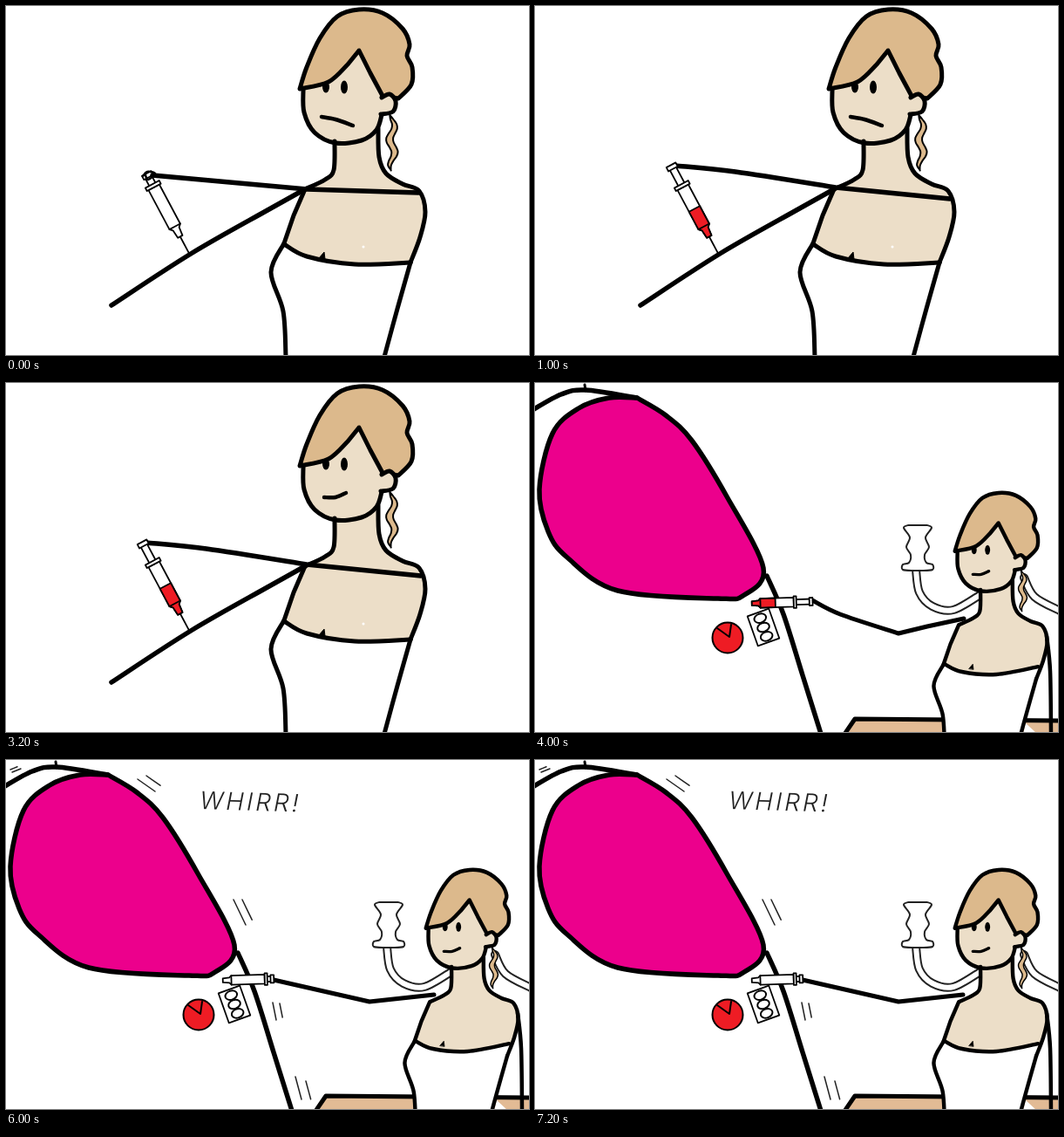
Recreate the animation shown at these times as an HTML page with a canvas. Size 600x400 px, loop 8000 ms.

```html
<!DOCTYPE html>
<html lang="en">
<head>
<meta charset="utf-8">
<style>
  html, body { margin: 0; width: 100%; height: 100%; overflow: hidden; background: #fff; }
  canvas { display: block; }
</style>
</head>
<body>
<canvas id="stage" width="600" height="400"></canvas>
<script>
const ctx = document.getElementById('stage').getContext('2d');
const SKIN = '#ecdec8', HAIR = '#dcb98c', RED = '#ee1c24', PINK = '#ec008c', WOOD = '#e2bb95';
const INK = '#000', PENCIL = '#222', PAPER = '#fff';
const LOOP = 8000;

// Smooth curve through "x,y x,y ..."; "|" makes a corner between two curves.
function trace(points) {
  ctx.beginPath();
  points.split('|').forEach((part, i) => {
    const p = part.trim().split(/\s+/).map(s => s.split(',').map(Number));
    ctx[i ? 'lineTo' : 'moveTo'](...p[0]);
    for (let k = 0; k < p.length - 1; k++) {
      const a = p[k - 1] || p[k], b = p[k], c = p[k + 1], d = p[k + 2] || c;
      ctx.bezierCurveTo(b[0] + (c[0] - a[0]) / 6, b[1] + (c[1] - a[1]) / 6,
                        c[0] - (d[0] - b[0]) / 6, c[1] - (d[1] - b[1]) / 6, ...c);
    }
  });
}

function stroke(width, color = INK) {
  ctx.lineWidth = width;
  ctx.strokeStyle = color;
  ctx.stroke();
}

function ink(points, width, color) {
  trace(points);
  stroke(width, color);
}

function fill(points, color) {
  trace(points);
  ctx.fillStyle = color;
  ctx.fill();
}

function shape(points, color, width, line) {
  fill(points, color);
  ctx.closePath();
  stroke(width, line);
}

function oval(x, y, rx, ry, color) {
  ctx.beginPath();
  ctx.ellipse(x, y, rx, ry, 0, 0, 7);
  ctx.fillStyle = color;
  ctx.fill();
}

function placed(x, y, angle, scale, draw) {
  ctx.save();
  ctx.translate(x, y);
  ctx.rotate(angle);
  ctx.scale(scale, scale);
  draw();
  ctx.restore();
}

// Completes the right half of an outline by reflecting it in x = 0.
function mirror(half) {
  const left = half.split(/\s+/).reverse().map(s => s === '|' ? s : '-' + s);
  return `${half} | ${left.join(' ')}`;
}

// Points down from the thumb rest; push is how far the plunger has moved.
function syringe(x, y, angle, scale, { push = 0, full = false, needle = false }) {
  placed(x, y, angle, scale, () => {
    const part = (half, color = PAPER) => shape(mirror(half), color, 1.8 / scale);
    const nozzle = '7,78 | 4,81 | 3,91';
    if (needle) ink('0,88 0,112', 1.8);
    part(`4,${push} | 4,24`);
    part(`6,${push - 2} | 6,${push + 3}`);
    part('7,27 | ' + nozzle);
    if (full) part('7,55 | ' + nozzle, RED);
    ink('-7,78 7,78', 1.8 / scale);
    part('9,23 | 9,27');
  });
}

// A lock of hair that sways around x and tapers at both ends.
function lock(x, top, bottom) {
  const edge = side => Array.from({ length: 13 }, (_, i) => {
    const u = i / 12, y = top + u * (bottom - top);
    const sway = 3 * Math.cos((y - top - 13) / 30 * 2 * Math.PI);
    return `${x + sway + side * 4 * Math.sin(Math.PI * u) ** .6},${y}`;
  });
  shape([...edge(-1), ...edge(1).reverse()].join(' '), HAIR, 2);
}

function woman({ pen, neckline, cleavage, smiling }) {
  const left = '377,155 376,188 366,199 343,210 | 330,240 319,272';
  const waist = '319,272 304,305 318,350 321,402';
  const right = '427,140 428,173 436,192 455,204 474,212 481,236 475,265 464,294';
  const side = '464,294 449,347 434,402';
  const jaw = '341,96 342,122 354,145 378,157 408,154 425,142 431,125';
  const ear = '431,105 440,101 447,109 444,121 430,124';
  const backwards = right.split(' ').reverse().join(' ');

  lock(443, 125, 188);
  fill(`${waist} | ${side.split(' ').reverse().join(' ')}`, PAPER);
  fill(`${left} | ${neckline} | ${backwards}`, SKIN);
  fill(`${jaw} | 432,103 | 405,51`, SKIN);
  ink(jaw, pen);
  shape('337,95 345,70 360,37 380,12 405,4 432,8 455,26 463,44 460,57 466,70 465,90 450,106 | ' +
        '432,103 | 418,77 405,51 | 392,67 370,87 337,95', HAIR, pen);
  fill(ear, SKIN);
  ink(ear, pen);

  oval(367, 93, 4, 6.5, INK);
  oval(388, 93, 4, 7.5, INK);
  ink(smiling ? '365,131 378,131 390,126' : '362,127 378,130 398,137', 4.5);

  for (const line of [left, waist, right, side, neckline]) ink(line, pen);
  placed(362, cleavage, 0, 1, () => shape('-3,3 | 3,-4 | 4,4', INK, 1));
}

function closeUp(t) {
  const filled = t >= 1000;
  woman({ pen: 5, neckline: '319,273 345,287 400,296 464,294', cleavage: 286, smiling: t >= 2000 });
  oval(410, 276, 1.5, 1.5, PAPER);
  ink('121,343 212,284 300,234 343,210', 5.5);

  if (filled) {
    ink('161,183 230,190 345,208 | 476,221', 5.5);
    syringe(157, 184, -.49, 1, { full: true, needle: true });
  } else {
    syringe(157, 184, -.49, 1, { push: 11, needle: true });
    ink('168,194 345,210 | 473,214', 5.5);
    ink('157,195 162,190 171,192 163,199 160,194', 2.5);
  }
}

function candlestick() {
  const tubes = ['437,214 441,240 456,256 480,260 512,242', '561,223 573,245 602,261'];
  for (const tube of tubes) {
    ink(tube, 10, PENCIL);
    ink(tube, 6, PAPER);
  }
  placed(439, 0, 0, 1, () =>
    shape(mirror('11,163 16,166 9,177 13,188 8,197 10,206 17,208 17,214 4,215'), PAPER, 2, PENCIL));
}

function machine() {
  shape('117,17 85,17 50,29 20,58 5,122 15,170 37,200 95,238 210,247 240,243 262,212 ' +
        '220,130 180,66 150,37 117,17', PINK, 5.5);
  ink('117,17 58,8 30,13 -3,31', 5.5);
  ink('57,2 58,9', 3);
  ink('266,221 285,265 307,335 328,402', 5.5);

  oval(221, 292, 17.5, 17.5, RED);
  stroke(2);
  ink('209,281 | 223,291 | 225,277', 2);

  placed(262, 280, -.34, 1, () => {
    shape(mirror('13,-18 | 13,18'), PAPER, 1.8);
    for (const y of [-11, 0, 11]) {
      oval(0, y, 7, 5, PAPER);
      stroke(2);
    }
  });
}

// Two parallel strokes, the second one shorter.
function shake(x, y, dx, dy, gapX, gapY) {
  ink(`${x},${y} ${x + dx},${y + dy}`, 1.5, PENCIL);
  ink(`${x + gapX},${y + gapY} ${x + gapX + dx * .8},${y + gapY + dy * .8}`, 1.5, PENCIL);
}

function whirr() {
  shake(151, 22, 20, 14, 10, -4);
  shake(261, 160, 14, 29, 10, 0);
  shake(306, 278, 4, 20, 8, 1);
  shake(332, 363, 7, 26, 12, 5);
  shake(7, 14, 10, -4, -2, -3);
  placed(222, 56, .03, 1, () => {
    ctx.font = 'italic 300 28px Inter, "Open Sans", sans-serif';
    ctx.letterSpacing = '3px';
    ctx.fillStyle = PENCIL;
    ctx.fillText('WHIRR!', 0, 0);
  });
}

function room(t) {
  const injected = t >= 6000;
  machine();
  candlestick();
  shape('354,404 | 367,385 | 604,387 | 604,404', WOOD, 5);
  fill('563,390 | 576,402 | 560,402', PAPER);
  placed(234, 123, 0, .735, () =>
    woman({ pen: 6, neckline: '321,271 348,283 402,287 467,275', cleavage: 275, smiling: true }));
  ink('587,290 591,330 592,402', 4.5);

  if (injected) whirr();
  ink(injected ? '307,252 417,277 | 491,269' : '318,249 350,265 417,287 | 450,279 492,270', 5);
  syringe(317, 250.5, 1.54, .75, { push: injected ? 15 : 0, full: !injected });
}

function frame(now) {
  const t = now % LOOP;
  ctx.fillStyle = PAPER;
  ctx.fillRect(0, 0, 600, 400);
  ctx.lineCap = ctx.lineJoin = 'round';
  (t < 4000 ? closeUp : room)(t);
  requestAnimationFrame(frame);
}
requestAnimationFrame(frame);
</script>
</body>
</html>
```
